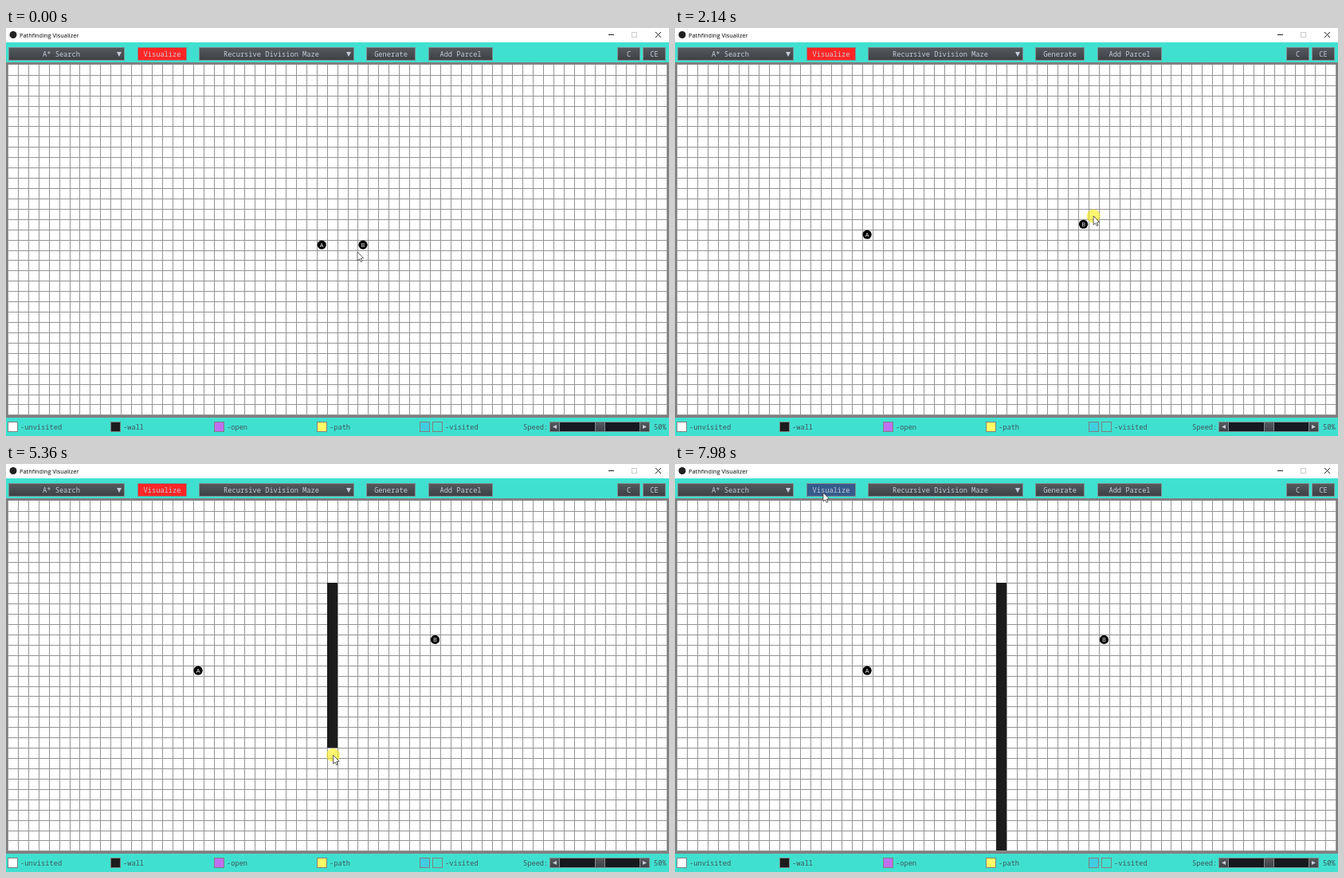
Recreate the animation shown at these times as an HTML page with a canvas. Size 832 by 512 pixels, loop 8000 ms.

```html
<!DOCTYPE html>
<html>
<head>
<meta charset="utf-8">
<title>Pathfinding Visualizer</title>
<style>
  html, body { margin: 0; width: 100%; height: 100%; overflow: hidden; }
  canvas { display: block; }
</style>
</head>
<body>
<canvas id="stage" width="832" height="512"></canvas>
<script>
const g = document.getElementById('stage').getContext('2d');
const MONO = '8.7px "Noto Sans Mono", "DejaVu Sans Mono", monospace';
const SANS = '"Open Sans", "Noto Sans", sans-serif';
const LOOP = 8000, LAG = 80;
const CELL = 12.926, LEFT = 2, TOP = 45.9, COLS = 64, ROWS = 34;
const TEAL = '#40e0d0', LIGHT = '#c5cbd8', EDGE = '#7d8f90', WALL = '#1c1c1c';

// Turning points of the pointer: time, x, y
const path = [
  [20, 441, 281], [780, 389, 271], [900, 383, 271], [1250, 239, 256],
  [1620, 449, 273], [2140, 525, 236], [2500, 549, 217], [2940, 212, 256],
  [3200, 379, 220], [3700, 409, 158], [3900, 409, 158], [4480, 409, 241],
  [5720, 411, 410], [6250, 409, 462], [6800, 408, 477], [6960, 408, 477],
  [7480, 136, 17], [7680, 186, 36]
];
// Times at which the mouse button is held
const dragA = [700, 1250], dragB = [1610, 2540], drawWall = [3760, 6965], click = [7820, 7950];

const clamp = (v, lo, hi) => Math.min(hi, Math.max(lo, v));
const within = (t, [from, to]) => t >= from && t < to;

function slope(i, axis) {
  const a = path[i], b = path[i + 1];
  return a && b ? (b[axis] - a[axis]) / (b[0] - a[0]) : 0;
}

// Zero at turns, so the curve never overshoots
function tangent(i, axis) {
  const a = slope(i - 1, axis), b = slope(i, axis);
  return a * b > 0 ? 2 * a * b / (a + b) : 0;
}

function pointer(time) {
  const t = clamp(time, path[0][0], path[path.length - 1][0] - 1);
  const i = path.findIndex(k => k[0] > t) - 1;
  const span = path[i + 1][0] - path[i][0];
  const u = (t - path[i][0]) / span, v = 1 - u;
  return [1, 2].map(axis =>
    path[i][axis] * v * v * (1 + 2 * u) + path[i + 1][axis] * u * u * (1 + 2 * v) +
    span * u * v * (tangent(i, axis) * v - tangent(i + 1, axis) * u));
}

// The app reacts slightly later than the pointer moves
function cellAt(t, [from, to]) {
  const [x, y] = pointer(clamp(t - LAG, from, to));
  return [Math.floor((x - LEFT) / CELL), Math.floor((y - TOP) / CELL)];
}

const gridX = c => Math.round(LEFT + c * CELL);
const gridY = r => Math.round(TOP + r * CELL);

function rect(x, y, w, h, fill, border) {
  g.fillStyle = fill;
  g.fillRect(x, y, w, h);
  if (!border) return;
  g.strokeStyle = border;
  g.lineWidth = 1;
  g.strokeRect(x + .5, y + .5, w - 1, h - 1);
}

function text(s, x, y, color, align = 'left', font = MONO) {
  g.font = font;
  g.fillStyle = color;
  g.textAlign = align;
  g.fillText(s, x, y);
}

function shape(points, fill) {
  g.beginPath();
  points.forEach(([x, y]) => g.lineTo(x, y));
  g.closePath();
  g.fillStyle = fill;
  g.fill();
}

function disc(x, y, r, fill) {
  g.beginPath();
  g.arc(x, y, r, 0, 7);
  g.fillStyle = fill;
  g.fill();
}

function shade(y, h) {
  const s = g.createLinearGradient(0, y, 0, y + h);
  s.addColorStop(0, '#565a5e');
  s.addColorStop(1, '#3c4044');
  return s;
}

function titleBar() {
  rect(0, 0, 832, 18, '#fff');
  disc(9, 8.5, 4.5, '#222');
  text('Pathfinding Visualizer', 17, 11.5, '#000', 'left', '7.4px ' + SANS);
  rect(756, 8, 7, 1, '#222');
  rect(785, 5, 7, 7, '#fff', '#ccc');
  g.strokeStyle = '#222';
  g.beginPath();
  g.moveTo(815, 5); g.lineTo(822, 12);
  g.moveTo(822, 5); g.lineTo(815, 12);
  g.stroke();
}

function button(label, x, w, fill = shade(24, 17), cx = x + w / 2) {
  rect(x, 24, w, 17, fill, EDGE);
  text(label, cx, 36, LIGHT, 'center');
}

function dropdown(label, x, w) {
  const r = x + w;
  button(label, x, w, undefined, x + w / 2 - 6.5);
  shape([[r - 10, 30], [r - 4, 30], [r - 7, 36]], LIGHT);
}

function toolbar(t) {
  const color = within(t, click) ? '#2a4c88' : t > 7610 ? '#365a8c' : '#ff2626';
  dropdown('A* Search', 3, 146);
  button('Visualize', 165, 62, color);
  dropdown('Recursive Division Maze', 242, 195);
  button('Generate', 452, 62);
  button('Add Parcel', 530, 81);
  button('C', 767, 29);
  button('CE', 799, 29);
}

function legend() {
  const ink = '#40565a';
  const swatch = (x, fill) => rect(x, 494, 13, 13, fill, '#808080');
  const kinds = { unvisited: '#fff', wall: WALL, open: '#bf70f0', path: '#ffff66', visited: '#40cee0' };
  Object.entries(kinds).forEach(([name, fill], i) => {
    const x = gridX(i * 10);
    swatch(x, fill);
    text('-' + name, x + (name === 'visited' ? 32 : 16), 503.5, ink);
  });
  swatch(535, TEAL);
  text('Speed:', 649, 503.5, ink);
  rect(682, 494, 126, 13, '#15191e', EDGE);
  [682, 739, 795].forEach(x => rect(x, 494, 13, 13, shade(494, 13), EDGE));
  shape([[691, 498], [691, 503], [686, 500.5]], LIGHT);
  shape([[799, 498], [799, 503], [804, 500.5]], LIGHT);
  text('50%', 813, 503.5, ink);
}

function grid() {
  rect(0, 43, 832, 446, '#808080');
  rect(LEFT, 46, 828, 440, '#fff');
  for (let c = 0; c <= COLS; c++) rect(gridX(c), 46, 1, 440, '#949494');
  for (let r = 1; r <= ROWS; r++) rect(LEFT, gridY(r), 828, 1, '#949494');
}

function wall(t) {
  const [start] = drawWall;
  if (t < start + LAG) return;
  const [col, top] = cellAt(start, drawWall), y = gridY(top);
  const end = cellAt(t, drawWall)[1] + 1;
  rect(gridX(col), y, 13, gridY(end) - y, WALL);
}

function marker(letter, [c, r]) {
  const x = LEFT + (c + .5) * CELL, y = TOP + (r + .5) * CELL;
  disc(x, y, 5.6, '#000');
  text(letter, x, y + 2.7, '#fff', 'center', '7.5px ' + SANS);
}

function cursor(t) {
  const [x, y] = pointer(t);
  if ([dragA, dragB, drawWall, click].some(hold => within(t, hold)))
    disc(x, y, 8.5, 'rgba(250, 238, 0, .56)');
  shape([[0, 0], [0, 11], [2.5, 8.8], [4.2, 12.5], [5.9, 11.7], [4.3, 8.1], [7.6, 7.8]]
    .map(([a, b]) => [x + a, y + b]), '#fff');
  g.strokeStyle = '#333';
  g.lineWidth = .8;
  g.stroke();
}

function draw(t) {
  rect(0, 0, 832, 512, TEAL);
  titleBar();
  toolbar(t);
  legend();
  grid();
  wall(t);
  marker('A', cellAt(t, dragA));
  marker('B', cellAt(t, dragB));
  cursor(t);
}

function tick() {
  draw(performance.now() % LOOP);
  requestAnimationFrame(tick);
}
tick();
</script>
</body>
</html>
```
